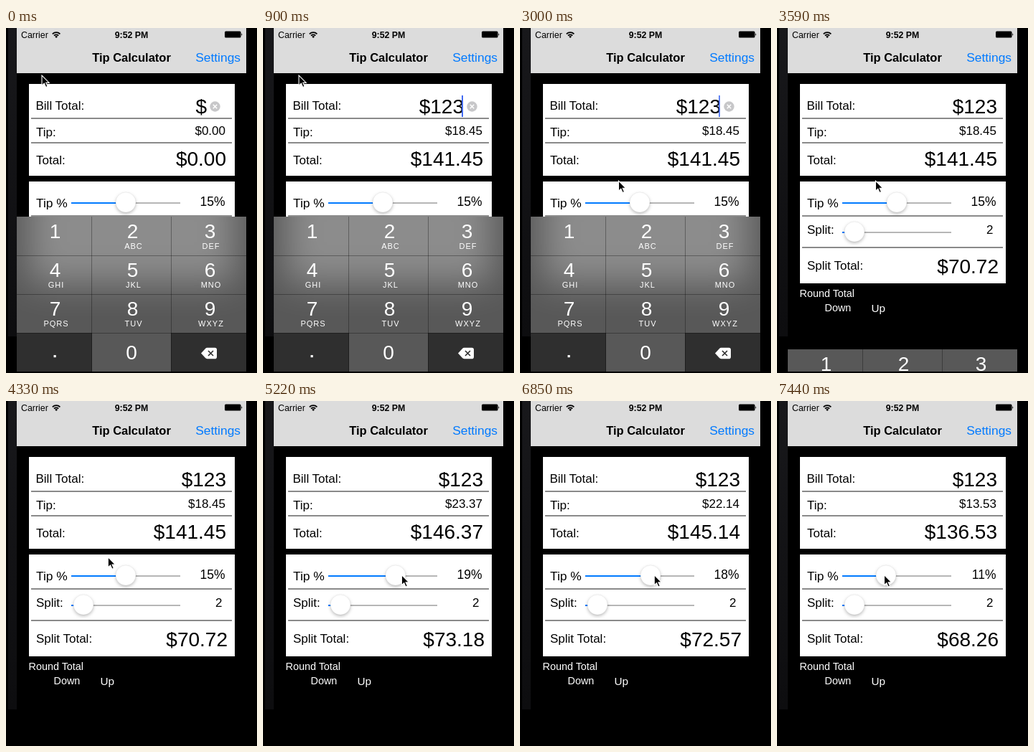
Recreate the animation shown at these times as an HTML page. Size 350x481 px, loop 8000 ms.

```html
<!DOCTYPE html>
<html lang="en">
<head>
<meta charset="utf-8">
<title>Tip Calculator</title>
<style>
  html, body { margin: 0; width: 100%; height: 100%; overflow: hidden; background: #000; }
  #stage { position: absolute; left: 0; top: 0; width: 350px; height: 481px; overflow: hidden; background: #000; }
  svg { position: absolute; left: 0; top: 0; display: block; overflow: hidden; }
  text { font: 17px "Liberation Sans", Arial, sans-serif; white-space: pre; }
  .big { font-size: 28px; }
  .end { text-anchor: end; }
  .small { font-size: 14.4px; fill: #fff; }
  .rule { fill: #8a8a8a; }
  .rail { fill: #b6b6b6; }
  .fill { fill: #007aff; }
  .thumb { fill: #fff; stroke: rgba(0,0,0,.1); stroke-width: .6; filter: drop-shadow(0 2.5px 2px rgba(0,0,0,.25)); }
  #clip { position: absolute; left: 15px; top: 0; width: 320px; height: 479px; overflow: hidden; }
  #pad { position: absolute; left: 0; top: var(--top); width: 320px; height: 216px; overflow: hidden; background: #585858; }
  /* The white card shining through the keypad; it stays put while the pad slides. */
  #glow { position: absolute; left: 17px; top: calc(214px - var(--top)); width: 287px; height: 142px;
          background: #fff; opacity: .31; filter: blur(24px); }
  #pad text { fill: #fff; text-anchor: middle; }
  #pad .digit { font-size: 28px; }
  #pad .letters { font-size: 11px; letter-spacing: 1px; }
</style>
</head>
<body>
<div id="stage">
  <svg width="350" height="481" viewBox="0 0 350 481">
    <linearGradient id="edge" x2="0" y2="1">
      <stop stop-color="#18181b"/><stop offset="1" stop-color="#0d0d0f"/>
    </linearGradient>
    <rect x="3" width="12" height="430" fill="url(#edge)"/>

    <rect x="15" width="320" height="63" fill="#dcdcdc"/>
    <text x="21" y="13.5" style="font-size:12.4px">Carrier</text>
    <g fill="none" stroke="#000" stroke-width="1.8">
      <path d="M64.8 8.300a7.600 7.600 0 0 1 10.600 0M67 10.700a4.600 4.600 0 0 1 6.200 0"/>
      <path d="M70.100 14l-1.900-2a2.700 2.700 0 0 1 3.800 0z" fill="#000" stroke="none"/>
    </g>
    <text x="175" y="13.5" text-anchor="middle" style="font-size:12.3px;font-weight:700">9:52 PM</text>
    <rect x="305" y="4.5" width="22.500" height="9" rx="1.5"/>
    <path d="M328.300 7.200q2 1.800 0 3.600z"/>
    <text x="175" y="47" text-anchor="middle" style="font-size:16.5px;font-weight:700">Tip Calculator</text>
    <text x="327" y="47" class="end" fill="#007aff" style="font-size:17.4px">Settings</text>

    <rect x="32" y="78" width="287" height="128" fill="#fff"/>
    <rect x="32" y="214" width="287" height="142" fill="#fff"/>
    <g class="rule">
      <rect x="35" y="125" width="280" height="2"/>
      <rect x="35" y="159" width="280" height="2"/>
      <rect x="35" y="261" width="280" height="2"/>
      <rect x="35" y="305" width="280" height="2"/>
    </g>

    <text x="41.5" y="114">Bill Total:</text>
    <text x="42" y="151">Tip:</text>
    <text x="42" y="190">Total:</text>
    <text x="42" y="250" style="font-size:17.4px">Tip %</text>
    <text x="42" y="287">Split:</text>
    <text x="42" y="337">Split Total:</text>

    <text id="bill" class="big end" y="119"></text>
    <text id="tip" class="end" x="306" y="149"></text>
    <text id="total" class="big end" x="307" y="192"></text>
    <text id="percent" class="end" x="305.5" y="248" style="font-size:17.5px"></text>
    <text class="end" x="301.5" y="287">2</text>
    <text id="share" class="big end" x="309" y="342"></text>

    <g id="clear">
      <circle cx="291.5" cy="109.5" r="7.2" fill="#c7c7c9"/>
      <path d="M288.800 106.800l5.400 5.400m0-5.400l-5.400 5.400" stroke="#fff" stroke-width="1.5"/>
    </g>
    <rect id="caret" x="277" y="94" width="2" height="30" fill="#426bf2"/>

    <rect class="rail" x="91" y="243" width="152" height="2"/>
    <rect class="fill" id="level" x="91" y="243" height="2"/>
    <circle class="thumb" id="thumb" cy="243" r="14"/>
    <rect class="rail" x="91" y="284" width="152" height="2"/>
    <rect class="fill" x="91" y="284" width="17" height="2"/>
    <circle class="thumb" cx="108" cy="284" r="14"/>

    <text class="small" x="31.5" y="375">Round Total</text>
    <text class="small" x="66.5" y="395">Down</text>
    <text class="small" x="131.5" y="396" style="font-size:15.3px">Up</text>
  </svg>

  <div id="clip"><div id="pad">
    <div id="glow"></div>
    <svg width="320" height="216" viewBox="15 0 320 216">
      <path d="M15 162h105v54H15zM230 162h105v54H230z" fill="rgba(0,0,0,.47)"/>
      <path d="M15 54.500h320M15 108.500h320M15 162.500h320M119.500 0v216M230.500 0v216" stroke="rgba(0,0,0,.32)"/>
      <g id="keys"></g>
      <rect x="66.500" y="193" width="3.200" height="3.200" fill="#fff"/>
      <path d="M272 190.500l6-6.600q1-1.100 2.500-1.100h10.700q2.800 0 2.800 2.800v9.800q0 2.800-2.800 2.800h-10.700q-1.500 0-2.500-1.100z" fill="#fff"/>
      <path d="M282 187l7 7m0-7l-7 7" stroke="#2d2d2d" stroke-width="1.6"/>
    </svg>
  </div></div>

  <svg width="350" height="481" viewBox="0 0 350 481">
    <path id="pointer" d="M0 0V14.200L3.300 11.200L5.700 16.600L8 15.600L5.700 10.400H10.200Z" stroke="#fff" stroke-width="1.1"/>
  </svg>
</div>

<script>
const LOOP = 8000;
const STEP = 148.7; // the screen refreshes in steps of this many ms
const $ = id => document.getElementById(id);

const clamp = v => Math.min(1, Math.max(0, v));
const span = (n, from, to) => clamp((n - from) / (to - from));
const mix = (a, b, u) => a + (b - a) * u;
const easeOut = (u, power) => 1 - (1 - u) ** power;
const smooth = u => u * u * (3 - 2 * u);
const bezier = (a, b, c, d, u) =>
  a * (1 - u) ** 3 + 3 * b * u * (1 - u) ** 2 + 3 * c * u * u * (1 - u) + d * u ** 3;

const money = cents => "$" + (cents / 100).toFixed(2);

// Half a cent goes to the even neighbour.
function halve(cents) {
  const low = Math.floor(cents / 2);
  return cents % 2 ? low + low % 2 : low;
}

// All motion below is in refresh steps n.
function caretAt(n) {
  if (n < 1 || n >= 23) return 0;
  return n < 9 ? 1 : clamp(.5 + 1.5 * Math.cos(2 * Math.PI * (n - .5) / 7));
}

const padAt = n => n < 23 ? 263 : 263 + 218 * (1 - Math.exp(-.95 * (n - 22)));

// Drag right, hold, drag back.
function drag(n, start, peak, end, power) {
  return n < 42 ? mix(start, peak, easeOut(span(n, 33, 40), power))
                : mix(peak, end, smooth(span(n, 42, 50)));
}

function pointerAt(n) {
  if (n >= 33) return [drag(n, 168, 225, 149.5, 1.75), 242.5];
  if (n >= 28) {
    const u = smooth(span(n, 28, 32));
    return [mix(137.5, 168, u), mix(213, 243, u)];
  }
  const u = easeOut(span(n, 8, 14), 2);
  return [bezier(50, -35, 143, 137.5, u), bezier(66, 100, 240, 213, u)];
}

function buildKeys() {
  const letters = " ABC DEF GHI JKL MNO PQRS TUV WXYZ".split(" ");
  const label = (cls, x, y, s) => `<text class="${cls}" x="${x}" y="${y}">${s}</text>`;
  $("keys").innerHTML = letters.map((s, i) => {
    const x = 68.5 + 108 * (i % 3), y = 54 * Math.floor(i / 3);
    return label("digit", x, y + 30, i + 1) + label("letters", x + 1.5, y + 45, s);
  }).join("") + label("digit", 175, 199, 0);
}

function put(id, text) {
  if ($(id).textContent !== text) $(id).textContent = text;
}

function render(t) {
  const n = Math.floor(t / STEP);
  const typed = "123".slice(0, Math.floor(n / 2));
  const thumb = drag(n, 167, 212, 152, 1.5);
  const percent = Math.floor((thumb - 105) / 124 * 30);
  const tip = typed * percent;
  const total = typed * 100 + tip;
  const editing = n < 23;
  const top = padAt(n);

  put("bill", "$" + typed);
  put("tip", money(tip));
  put("total", money(total));
  put("percent", percent + "%");
  put("share", money(halve(total)));

  $("bill").setAttribute("x", editing ? 280 : 307);
  $("clear").style.display = editing ? "" : "none";
  $("caret").style.opacity = caretAt(n);
  $("thumb").setAttribute("cx", thumb);
  $("level").setAttribute("width", thumb - 91);
  $("pad").style.setProperty("--top", Math.round(top) + "px");
  $("pad").style.display = top < 479 ? "" : "none";
  $("pointer").setAttribute("transform", `translate(${pointerAt(n)})`);
}

buildKeys();
const start = performance.now();
function tick() {
  render((performance.now() - start) % LOOP);
  requestAnimationFrame(tick);
}
tick();
</script>
</body>
</html>
```
